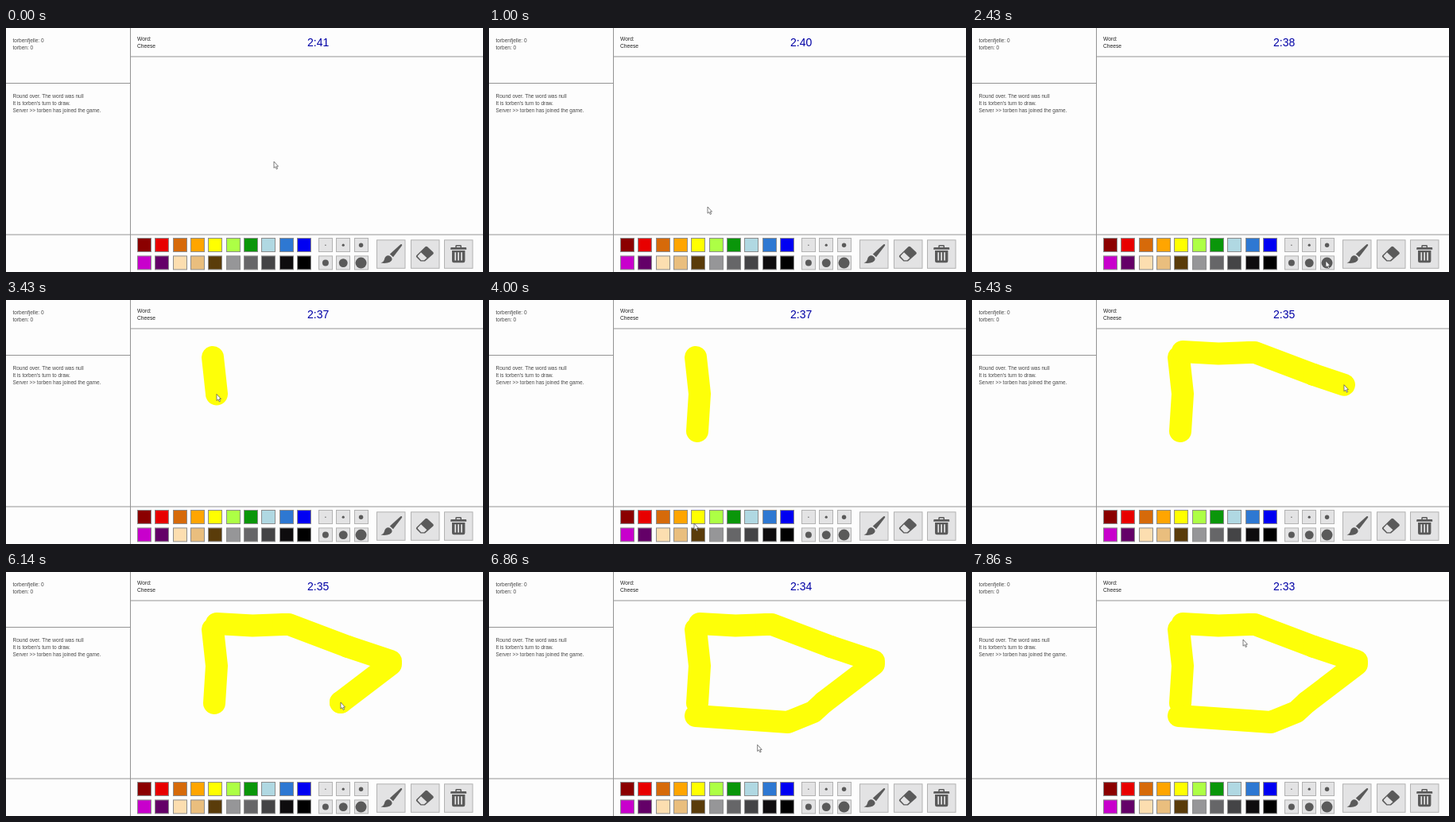
An HTML page for the animation above (8 s loop, 600 by 307 pixels).

```html
<!DOCTYPE html>
<html lang="en">
<head>
<meta charset="utf-8">
<title>Drawing game</title>
<style>
  html, body { margin: 0; width: 100%; height: 100%; overflow: hidden; background: #fdfdfd; }
  svg { display: block; width: 100vw; height: 100vh; }
  text { font-family: "Liberation Sans", Arial, sans-serif; font-size: 6.5px; fill: #484848; }
  .word { font-size: 6.7px; fill: #222; }
  #timer { font-size: 14px; fill: #0000a6; }
  .rule { fill: none; stroke: #949494; }
  .button { fill: #e3e3e4; stroke: #b2b2b2; }
  .icon { fill: #5a5a5a; }
  .light { fill: #e3e3e4; }
  #ink { fill: none; stroke: #feff08; stroke-width: 28; stroke-linecap: round; stroke-linejoin: round; }
</style>
</head>
<body>
<svg viewBox="0 0 600 307">
  <rect width="600" height="307" fill="#fdfdfd"/>
  <g id="ink"></g>
  <path class="rule" d="M156.5 0V307M0 69.5H156M156 36H600M0 260H600"/>
  <text x="8.5" y="18">torbenfjelle: 0</text>
  <text x="8.5" y="27">torben: 0</text>
  <text x="8.5" y="88">Round over. The word was null</text>
  <text x="8.5" y="97">It is torben's turn to draw.</text>
  <text x="8.5" y="106">Server &gt;&gt; torben has joined the game.</text>
  <text class="word" x="165" y="16">Word:</text>
  <text class="word" x="165" y="24.7">Cheese</text>
  <text id="timer" x="379" y="22.5"></text>
  <g id="tools"></g>
  <g class="icon">
    <path d="M496.3 272.3q2.4-1 1.8 1.5L487 288.2 482.8 284.6Z"/>
    <path d="M481.2 286.3c2 .3 4.2 2.2 4.4 4.2.2 4-6.5 6.4-14.1 5 3.4-1 4-3 4.6-5 .7-2.7 2.5-4.4 5.1-4.2Z"/>
    <path d="M527.4 275.2q1.4-1 2.7.1L537.3 282q1.2 1.2 0 2.4L527 293.6H521.5L516.4 288.4q-1.2-1.2 0-2.3Z"/>
    <path class="light" d="M522 282.2 529.4 289.2 526 292.2H522.2L518 287.8q-.6-.7 0-1.3Z"/>
    <path d="M565.3 276V274.4q0-1.4 1.4-1.4H571.6q1.4 0 1.4 1.4V276H578.2q1 0 1 1V278.8H559.2V277q0-1 1-1ZM566.8 276H571.5V274.5H566.8Z"/>
    <path d="M561 280H577.4V293q0 2.2-2.2 2.2H563.2q-2.2 0-2.2-2.2Z"/>
    <path class="light" d="M564.4 282.2h1.7v10.4h-1.7ZM568.3 282.2h1.7v10.4h-1.7ZM572.2 282.2h1.7v10.4h-1.7Z"/>
  </g>
  <path id="cursor" d="M0 0V8.2L1.9 6.5 3.2 9.5 4.6 8.9 3.3 6.1H5.5Z" fill="#fff" stroke="#484848" stroke-width=".7"/>
</svg>
<script>
const $ = id => document.getElementById(id);
const LOOP = 8000, RATE = 7, LAST = 55;

const palette = [
  "#8b0000 #e80000 #d66a0a #ffa500 #ffff00 #adff45 #0a960a #b0d8e2 #2e78d2 #0000f2",
  "#c800cc #640068 #fcdeb0 #e9be7e #5a3c0a #969698 #666668 #444446 #0e0c0e #000000"
].map(row => row.split(" "));

// A leg runs at constant speed from the end of the one before and arrives at step `end`.
const legs = [];
let here = "337,168", now = 0;

function leg(end, points, pen) {
  const path = document.createElementNS("http://www.w3.org/2000/svg", "path");
  path.setAttribute("d", `M${here}L${points}`);
  if (pen) $("ink").append(path);
  legs.push({ path, pen, start: now, end, length: path.getTotalLength() });
  here = points.split(" ").pop();
  now = end;
}
const move = (end, points) => leg(end, points, false);
const paint = (end, points) => leg(end, points, true);

// Reach for a colour, then the largest brush.
move(5, "252,294");
move(7, "275,225");
move(8, "268,88");
move(11, "262,86");
move(14, "252,272");
move(17, "445,293");
move(19, "449,254");
move(22, "260,72");
// Left side.
paint(26, "265,118 262,165");
move(28, "258,281");
move(30, "265,65");
// Around the wedge, with a short rest on the slope.
paint(32, "310,67.5 349,66");
paint(35, "356,66 430,94");
move(36, here);
paint(43, "484,112 484,116 421,164");
paint(47, "408,176 376,189 260,181");
// Back to the tools.
move(50, "493,290");
move(52, "250,294");
move(LAST, "341,85");

function box(x, y, size, attrs) {
  return `<rect x="${Math.round(x) + 0.5}" y="${y}" width="${size}" height="${size}" ${attrs}/>`;
}

function buildTools() {
  const pitch = 22.33;
  let out = "";
  palette.forEach((colors, row) => {
    const y = 264.5 + row * 22.4;
    colors.forEach((color, i) => {
      out += box(165 + i * pitch, y, 17, `fill="${color}" stroke="#8c8c8c"`);
    });
    for (let i = 0; i < 3; i++) {
      const x = 393 + i * pitch, n = row * 3 + i;
      const r = 0.7 + 0.85 * n + 0.082 * n * n;
      out += box(x, y, 17, 'class="button"');
      out += `<circle class="icon" cx="${x + 8.9}" cy="${y + 8.7}" r="${r}"/>`;
    }
  });
  for (let i = 0; i < 3; i++) out += box(466 + i * 42.5, 266.8, 35.5, 'class="button"');
  $("tools").innerHTML = out;
}

function draw(ms) {
  const step = Math.min(LAST, Math.floor((ms + 5) * RATE / 1000));
  const left = 161 - Math.floor((step + 4) / RATE);
  $("timer").textContent = Math.floor(left / 60) + ":" + String(left % 60).padStart(2, "0");

  for (const { path, pen, start, end, length } of legs) {
    const done = length * Math.min(1, Math.max(0, (step - start) / (end - start)));
    if (pen) {
      path.style.display = step < start ? "none" : "";
      path.setAttribute("stroke-dasharray", `${done} 999`);
    }
    if (step >= start && step <= end) {
      const { x, y } = path.getPointAtLength(done);
      $("cursor").setAttribute("transform", `translate(${x} ${y})`);
    }
  }
}

buildTools();
draw(0);
const begin = performance.now();
function tick() {
  draw((performance.now() - begin) % LOOP);
  requestAnimationFrame(tick);
}
requestAnimationFrame(tick);
</script>
</body>
</html>
```
